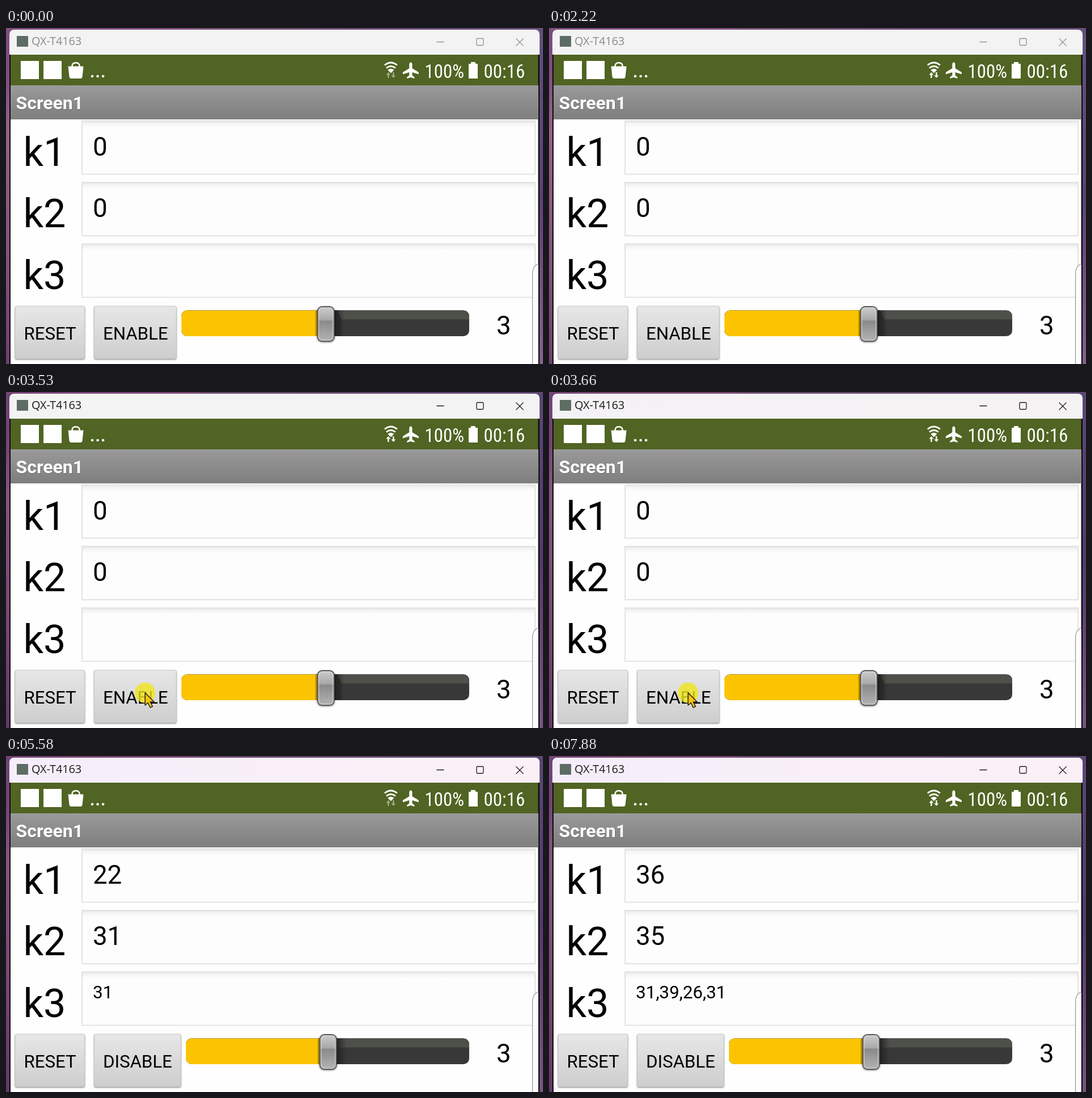
Recreate the animation shown at these times as an HTML page. Size 946 by 592 pixels, loop 8 s.

```html
<!DOCTYPE html>
<html lang="en">
<head>
<meta charset="utf-8">
<title>Sensor screen</title>
<style>
html, body { margin: 0; width: 100%; height: 100%; overflow: hidden; background: #6b4a7c; }
svg { display: block; width: 946px; height: 592px; font-family: Roboto, Arial, sans-serif; }
.title { font: 19.8px "Open Sans", "Noto Sans", sans-serif; }
.status { font: 33px "Roboto Condensed", Roboto, sans-serif; font-stretch: 75%; fill: #fff; }
.label { font-size: 70px; }
.value { font-size: 45.5px; }
.list { font-size: 31.3px; }
.btn { font-size: 31.2px; }
</style>
</head>
<body>
<svg viewBox="0 0 946 592">
  <defs>
    <linearGradient id="leftEdge" x2="0" y2="1">
      <stop stop-color="#7d4e82"/><stop offset=".12" stop-color="#804a80"/>
      <stop offset=".3" stop-color="#97608a"/><stop offset=".7" stop-color="#85507c"/><stop offset="1" stop-color="#6d3f6d"/>
    </linearGradient>
    <linearGradient id="rightEdge" x2="0" y2="1">
      <stop stop-color="#62507e"/><stop offset=".5" stop-color="#5d3f78"/><stop offset="1" stop-color="#84618e"/>
    </linearGradient>
    <linearGradient id="topEdge">
      <stop stop-color="#84507f"/><stop offset=".35" stop-color="#87527f"/>
      <stop offset=".36" stop-color="#765476"/><stop offset="1" stop-color="#685079"/>
    </linearGradient>
    <linearGradient id="tint"><stop stop-color="#f5eefa"/><stop offset="1" stop-color="#fbf0f6"/></linearGradient>
    <linearGradient id="header" x2="0" y2="1"><stop stop-color="#9a9a9a"/><stop offset="1" stop-color="#7e7e7e"/></linearGradient>
    <linearGradient id="field" x2="0" y2="1">
      <stop stop-color="#e6e6e6"/><stop offset=".05" stop-color="#f4f4f4"/><stop offset=".12" stop-color="#fdfdfd"/>
    </linearGradient>
    <linearGradient id="button" x2="0" y2="1"><stop stop-color="#e7e7e7"/><stop offset="1" stop-color="#cecece"/></linearGradient>
    <linearGradient id="thumb" x2="0" y2="1">
      <stop stop-color="#cdcdcd"/><stop offset=".38" stop-color="#a9a9a9"/>
      <stop offset=".42" stop-color="#8a8a8a"/><stop offset="1" stop-color="#b4b4b4"/>
    </linearGradient>
    <linearGradient id="shade"><stop stop-color="#222"/><stop offset="1" stop-color="#222" stop-opacity="0"/></linearGradient>
    <filter id="soft" x="-20%" y="-20%" width="140%" height="140%"><feGaussianBlur stdDeviation="1.5"/></filter>
    <clipPath id="trackClip"><rect id="trackShape" y="497.500" height="45.500" rx="10"/></clipPath>
  </defs>

  <rect width="946" height="592" fill="url(#topEdge)"/>
  <rect y="3" width="8" height="589" fill="url(#leftEdge)"/>
  <rect x="938" y="3" width="8" height="589" fill="url(#rightEdge)"/>
  <rect id="edgeShade" width="946" height="592" fill="#2d1040"/>

  <path id="bar" d="M6 47V12q0-9 9-9H931q9 0 9 9V47Z" fill="#f3f3f3"/>
  <path id="barTint" d="M6 47V12q0-9 9-9H931q9 0 9 9V47Z" fill="url(#tint)"/>
  <rect x="19" y="14" width="20" height="19" rx="1" fill="#5d6d63"/>
  <text id="name" class="title" x="45" y="30">QX-T4163</text>
  <path id="controls" d="M758.5 24.5h13M829 20q0-1.500 1.500-1.500h9q1.500 0 1.500 1.500v9q0 1.500-1.500 1.500h-9q-1.500 0-1.500-1.500ZM898.500 18.500l13 13M911.500 18.500l-13 13" fill="none" stroke-width="1.300"/>

  <rect x="6" y="47" width="934" height="545" fill="#0c0c0c"/>
  <rect x="8" y="101" width="929.500" height="491" fill="#fefefe"/>
  <rect x="8" y="47" width="929.500" height="54" fill="#506423"/>
  <rect x="8" y="101" width="929.500" height="60" fill="url(#header)"/>
  <g fill="#fff">
    <rect x="26" y="58" width="32" height="32"/>
    <rect x="66" y="58" width="32" height="32"/>
    <path d="M109.500 67.500H136.500L134.500 86q-.5 3-3.500 3H115q-3 0-3.500-3Z"/>
    <path d="M116.500 69V66q1-4.700 6.500-4.700t6.500 4.700V69" fill="none" stroke="#fff" stroke-width="2.500"/>
    <circle cx="152" cy="85" r="2.300"/><circle cx="161.500" cy="85" r="2.300"/><circle cx="171" cy="85" r="2.300"/>
    <path d="M667 65.500q11-9 22 0M670 70.500q8-6.500 16 0" fill="none" stroke="#fff" stroke-width="2.800"/>
    <path d="M672.500 74q5.500-4.500 11 0L678 79.500Z"/>
    <path id="traffic" d="M673.500 78l4 4.500h-2.800V88h-2.400V82.500h-2.800ZM682.500 88l-4-4.500h2.800V78h2.400v5.500h2.800Z"/>
    <path d="M713 60.500q2.600 0 2.600 4v6.500L727 78v3.500l-11.400-3.500V83.500l4 3V89L713 87l-6.600 2v-2.500l4-3V78L699 81.500V78l11.400-7V64.500q0-4 2.600-4Z"/>
    <path d="M819 60h8v3h4V89H815V63h4Z"/>
  </g>
  <text class="status" x="737.500" y="87.500">100%</text>
  <text class="status" x="841.500" y="87.500">00:16</text>
  <g font-size="32" font-weight="700">
    <text x="18" y="144" fill="#444" opacity=".5">Screen1</text>
    <text x="17.500" y="143" fill="#fff">Screen1</text>
  </g>

  <g id="rows"></g>
  <path d="M937.500 416q-10 3-10 18V592h10Z" fill="#fcfcfc"/>
  <path d="M937.500 416q-10 3-10 18V592" fill="none" stroke="#9b9b9b" stroke-width="1.300"/>

  <g id="buttons"></g>

  <g clip-path="url(#trackClip)">
    <rect x="300" y="497" width="520" height="47" fill="#383838"/>
    <rect x="300" y="497" width="520" height="16.500" fill="#4e514a"/>
    <path id="notch" d="M579 497h4l8 16.500v30h-12Z" fill="#303030"/>
    <rect id="thumbShade" y="497" width="19" height="47" fill="url(#shade)"/>
    <rect id="filled" x="300" y="497" height="47" fill="#fcc400"/>
    <rect id="fillShade" y="497" width="4" height="47" fill="#8a6c00" opacity=".45"/>
  </g>
  <g id="knob">
    <rect x="-.5" y="491" width="32" height="63" rx="9" fill="#000" opacity=".45" filter="url(#soft)"/>
    <rect x="1" y="491" width="29" height="61" rx="8" fill="url(#thumb)" stroke="#5a5a5a" stroke-width="1.800"/>
    <rect x="3" y="493" width="25" height="57" rx="6" fill="none" stroke="#ddd" stroke-opacity=".65" stroke-width="1.500"/>
  </g>
  <text class="value" x="864" y="540">3</text>

  <g id="cursor">
    <circle id="press" r="18" fill="#f0e61c" opacity=".8"/>
    <path d="M0 0V22l5-4.500 4 8.500 4.200-2-4-8H16Z" fill="#fcc30c" stroke="#222" stroke-width="1.500" stroke-linejoin="round"/>
  </g>
</svg>
<script>
const LOOP = 8000;
const $ = id => document.getElementById(id);
const set = (id, attrs) => {
  for (const key in attrs) $(id).setAttribute(key, attrs[key]);
};
const show = (id, on) => set(id, { visibility: on ? "visible" : "hidden" });

const row = (i, cls, textY) => {
  const y = 163.5 + i * 108.5;
  return `<text class="label" x="30.5" y="${242.5 + i * 108.7}">k${i + 1}</text>
    <rect x="134" y="${y}" width="798" height="94" fill="url(#field)" stroke="#e0e0e0" stroke-width="1.800"/>
    <text id="k${i + 1}" class="${cls}" x="153" y="${textY}"></text>`;
};
$("rows").innerHTML = row(0, "value", 224.5) + row(1, "value", 333) + row(2, "list", 427);

const button = (id, x, width) => `
  <rect id="${id}Shadow" x="${x}" y="492" width="${width}" height="92" rx="2" fill="#555" opacity=".8" filter="url(#soft)"/>
  <rect id="${id}Face" x="${x}" y="490" width="${width}" height="92.500" rx="2" fill="url(#button)" stroke="#c4c4c4"/>
  <text id="${id}Text" class="btn" x="${x + 15.5}" y="549"></text>`;
$("buttons").innerHTML = button("reset", 16, 122.5) + button("toggle", 155.5, 145);
$("resetText").textContent = "RESET";

// [time, value] steps, each held until the next one
const k1 = [[0, "0"], [4850, "22"], [5980, "27"], [7100, "36"]];
const k2 = [[0, "0"], [4850, "31"], [5810, "39"], [6830, "26"], [7700, "35"]];
const k3 = [[0, ""], [4850, "31"], [5810, "31,39"], [6830, "31,39,26"], [7800, "31,39,26,31"]];
const traffic = [[0, false], [2010, true], [3850, false], [5800, true]];
const path = [[2250, 650, 600], [2650, 561, 523], [2850, 561, 523], [3400, 245, 530], [3900, 245, 530]];

const held = (steps, t) => steps.filter(s => s[0] <= t).pop()[1];

function pointer(t) {
  const i = path.findIndex(p => p[0] > t);
  if (i < 1) return null;
  const [t0, x0, y0] = path[i - 1], [t1, x1, y1] = path[i];
  const u = (t - t0) / (t1 - t0), e = u * u * (3 - 2 * u);
  return [x0 + (x1 - x0) * e, y0 + (y1 - y0) * e];
}

function draw(t) {
  const focused = t >= 3460, enabled = t >= 3800;
  set("name", { fill: focused ? "#1b1b1b" : "#8b8b8b" });
  set("controls", { stroke: focused ? "#1b1b1b" : "#939393" });
  set("edgeShade", { opacity: focused ? .15 : 0 });
  set("barTint", { opacity: Math.min(1, Math.max(0, (t - 3600) / 250)) });
  set("traffic", { fill: held(traffic, t) ? "#fff" : "#a1ab8a" });

  $("k1").textContent = held(k1, t);
  $("k2").textContent = held(k2, t);
  $("k3").textContent = held(k3, t);

  const width = enabled ? 152.5 : 144.5;
  const left = enabled ? 317 : 309, knob = enabled ? 552 : 548;
  $("toggleText").textContent = enabled ? "DISABLE" : "ENABLE";
  set("toggleShadow", { width });
  set("toggleFace", { width });
  set("trackShape", { x: left, width: 816 - left });
  set("filled", { width: knob + 12 - 300 });
  set("fillShade", { x: knob - 3 });
  set("thumbShade", { x: knob + 29 });
  set("knob", { transform: `translate(${knob})` });
  show("notch", !enabled);

  const at = pointer(t);
  show("cursor", at);
  if (at) set("cursor", { transform: `translate(${at})` });
  show("press", at && focused);
}

function tick() {
  draw(performance.now() % LOOP);
  requestAnimationFrame(tick);
}
tick();
</script>
</body>
</html>
```
